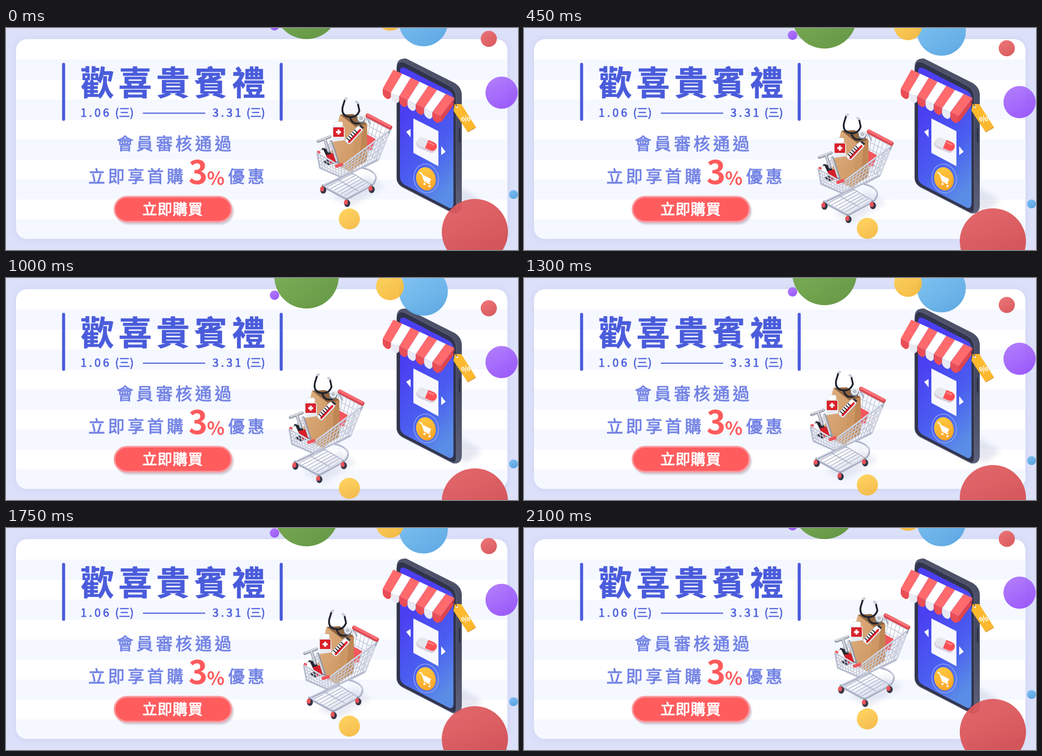
These frames come from a looping animation (920 by 400 pixels, 2.25 s). An HTML page:

```html
<!DOCTYPE html>
<html lang="zh-Hant">
<head>
<meta charset="utf-8">
<style>
html, body { margin: 0; width: 100%; height: 100%; overflow: hidden; }
svg { display: block; width: 920px; height: 400px; }
text { font-family: "Noto Sans CJK TC", "Noto Sans CJK", "Noto Sans", sans-serif; stroke-linejoin: round; }
.title { font-size: 60px; font-weight: 700; letter-spacing: 8px; fill: #4a5cdb; stroke: #4a5cdb; stroke-width: .6; }
.date { font-size: 20px; fill: #4a5cdb; stroke: #4a5cdb; stroke-width: .7; }
.day { letter-spacing: 4.2px; }
.note { font-size: 30px; letter-spacing: 5.2px; fill: #7282e4; stroke: #7282e4; stroke-width: .9; }
.red { font-weight: 700; fill: #ff5a5c; }
.buy { font-size: 26.5px; letter-spacing: .8px; fill: #fff; stroke: #fff; stroke-width: 1; }
</style>
</head>
<body>
<svg viewBox="0 0 920 400">
<defs>
  <filter id="soft" x="-30%" y="-30%" width="160%" height="160%"><feGaussianBlur stdDeviation="5"/></filter>
  <filter id="near" x="-10%" y="-30%" width="120%" height="170%"><feGaussianBlur stdDeviation="1.5"/></filter>
  <linearGradient id="screen" x1=".2" y1="0" x2=".6" y2="1">
    <stop offset=".25" stop-color="#4b3ff2"/><stop offset=".65" stop-color="#4a5df0"/><stop offset="1" stop-color="#5a8de6"/>
  </linearGradient>
  <linearGradient id="side" x1="0" y1="0" x2="0" y2="1">
    <stop offset="0" stop-color="#50546b"/><stop offset=".5" stop-color="#43475f"/><stop offset="1" stop-color="#5c6078"/>
  </linearGradient>
  <linearGradient id="gold" x1="0" y1="0" x2="0" y2="1">
    <stop offset="0" stop-color="#ffc93f"/><stop offset="1" stop-color="#faa52b"/>
  </linearGradient>
  <linearGradient id="paper" x1="0" y1="0" x2="1" y2="1">
    <stop offset="0" stop-color="#e0b184"/><stop offset="1" stop-color="#cc955f"/>
  </linearGradient>
  <clipPath id="card"><rect x="18" y="20" width="883" height="360" rx="20"/></clipPath>
</defs>

<rect width="920" height="400" fill="#dce0f9"/>
<rect x="16" y="18" width="887" height="365" rx="22" fill="#cbd1f2" opacity=".65" filter="url(#soft)"/>
<g clip-path="url(#card)">
  <rect width="920" height="400" fill="#fff"/>
  <path d="M0 75H920M0 147H920M0 219H920M0 291H920M0 363H920" stroke="#f5f8ff" stroke-width="36"/>
</g>

<path d="M103.500 65.500V164.500M494.500 65.500V164.500" stroke="#4a5cdb" stroke-width="5.500" stroke-linecap="round"/>
<text class="title" x="134" y="121">歡喜貴賓禮</text>
<text class="date day" x="134" y="160">1.06</text>
<text class="date" x="196" y="160">(三)</text>
<text class="date day" x="371" y="160">3.31</text>
<text class="date" x="432" y="160">(三)</text>
<path d="M246 153.500H358" stroke="#4a5cdb" stroke-width="2"/>
<text class="note" x="199" y="219">會員審核通過</text>
<text class="note" x="148" y="278">立即享首購</text>
<text class="red" x="328" y="281" font-size="58">3</text>
<text class="red" x="361" y="283" font-size="33">%</text>
<text class="note" x="399" y="278">優惠</text>

<rect x="197" y="307" width="212" height="47" rx="23.500" fill="#b9a9b8" opacity=".6" filter="url(#near)"/>
<rect x="195" y="304" width="210" height="45" rx="22.500" fill="#ff5c5e" stroke="#f99a9f" stroke-width="3"/>
<text class="buy" x="245" y="336">立即購買</text>

<g id="phone">
  <path d="M780 322 819 288 856 312 830 332Z" fill="#b9bed6" opacity=".35" filter="url(#soft)"/>
  <path d="M702 70Q702 54 719 55L806 99Q819 107 819 121V321Q818 336 803 334L712 287Q702 281 702 270Z" fill="url(#side)"/>
  <path d="M702 72Q703 57 716 62L797 104Q809 111 809 125V324Q809 336 799 331L712 286Q702 280 702 270Z" fill="#31344d" stroke="#747890" stroke-width=".7"/>
  <path d="M708 78Q708 68 719 73L794 112Q804 117 804 128V317Q803 328 794 323L717 283Q708 278 708 268Z" fill="url(#screen)"/>
  <path d="M815 180V206" stroke="#282b40" stroke-width="2"/>
  <path d="M732 163 777 186V249L732 225Z" fill="#f7f8ff"/>
  <path d="M719 187 727 182V197ZM782 213 790 223 782 229Z" fill="#fff"/>
  <g transform="rotate(23 756 209)">
    <rect x="738" y="205" width="37" height="16" rx="8" fill="#d9cfdd"/>
    <rect x="738" y="201" width="37" height="16" rx="8" fill="#e4e6ec"/>
    <path d="M756 201H767A8 8 0 0 1 767 217H756Z" fill="#ff5055"/>
    <path d="M759 205H768" stroke="#ff8587" stroke-width="2.500" stroke-linecap="round"/>
  </g>
  <g transform="rotate(-12 755 271)">
    <ellipse cx="755" cy="271" rx="22" ry="26" fill="none" stroke="#a7b5ff"/>
    <ellipse cx="755" cy="272" rx="17" ry="21" fill="#ef9a23"/>
    <ellipse cx="754" cy="271" rx="17" ry="20.500" fill="url(#gold)"/>
  </g>
  <path d="M743 260 747 262 752 276 762 281" fill="none" stroke="#fff" stroke-width="2"/>
  <path d="M748 264 764 272 761 279 751 274Z" fill="#fff"/>
  <circle cx="752" cy="281" r="2" fill="#fff"/><circle cx="761" cy="285" r="2" fill="#fff"/>
</g>
<g id="awning"></g>
<g id="tag">
  <path d="M806 137 818 137 844 178 829 187 804 149Z" fill="#fdb92e"/>
  <path d="M829 187 844 178 844 180 830 188Z" fill="#dc9222"/>
  <circle cx="810" cy="142" r="2" fill="#fff"/>
  <path d="M802 133Q808 134 810 142" fill="none" stroke="#34374f" stroke-width="1.200"/>
  <text x="826" y="170" font-size="16" font-weight="700" text-anchor="middle" fill="#fff" transform="rotate(-28 826 164)">%</text>
</g>

<g id="cart" stroke-linecap="round" stroke-linejoin="round">
  <path d="M585 306 650 264 680 286 622 322Z" fill="#b6bcd6" opacity=".28" filter="url(#soft)"/>
  <g id="deck" stroke="#b4bacd" stroke-width="1.500"></g>
  <g fill="none" stroke="#a9afc4" stroke-width="3">
    <path d="M668 238 640 252Q668 258 664 274 662 282 652 287L612 309 569 286 622 260"/>
    <path d="M667 236 640 250Q667 257 663 271 661 279 651 284L612 306 569 283 622 258" stroke="#d9ddea" stroke-width="1.500"/>
  </g>
  <g id="wheels"></g>
  <g id="back" stroke="#bfc4d5" stroke-width="1.200"></g>
  <path d="M644 189 664 200 659 219 640 224Z" fill="#f2575d"/>
  <path d="M600 156 624 155 649 173 626 181Z" fill="#8f6540"/>
  <path d="M600 156 628 178 619 259 580 240Z" fill="url(#paper)"/>
  <path d="M628 178 649 173V238L619 259Z" fill="#c08755"/>
  <path d="M628 178 641 175 634 248 619 259Z" fill="#cd9763"/>
  <g fill="none" stroke="#20232e" stroke-width="3.200">
    <path d="M609 129 605 142Q602 157 615 160 630 163 635 149L632 135"/>
    <path d="M618 160Q622 176 637 171"/>
    <path d="M609 128 612 127M632 135 629 133" stroke="#c9cdd6" stroke-width="4"/>
  </g>
  <circle cx="638" cy="164" r="7.500" fill="#777d8b"/>
  <circle cx="638" cy="162.500" r="6.500" fill="#eceff3"/><circle cx="638" cy="162.500" r="3.500" fill="#bcc2cb"/>
  <g transform="rotate(-47 626 192)">
    <rect x="606" y="186" width="38" height="12" rx="4" fill="#fff" stroke="#b5bac6"/>
    <path d="M610 194H639" stroke="#e8242d" stroke-width="4"/>
    <path d="M612 187V193M617 187V193M622 187V193M627 187V193M632 187V193" stroke="#252832" stroke-width="1.800"/>
    <rect x="643" y="188" width="4" height="8" fill="#363a45"/>
  </g>
  <path d="M586 176 608 178 609 202 588 205Z" fill="#e8ebf1"/>
  <rect x="590" y="169" width="15" height="9" rx="3" fill="#fff" stroke="#d3d7e0" stroke-width=".7"/>
  <rect x="588" y="179" width="19" height="17" rx="1" fill="#d9222b"/>
  <path d="M597.500 183V192M593 187.500H602" stroke="#fff" stroke-width="3.500" stroke-linecap="butt"/>
  <path d="M568 216 580 219 594 242 579 248 566 238Z" fill="#252631"/>
  <path d="M575 229 590 225 594 240 583 246Z" fill="#d5202a"/>
  <path d="M562 223 570 219 578 236 568 241Z" fill="#fff"/>
  <path d="M561 204 582 196M573 201 580 222M584 205 596 242" stroke="#8f95a3" stroke-width="5.500"/>
  <path d="M561 203 582 195M573 201 579 221M583 205 594 239" stroke="#d2d5dc" stroke-width="3"/>
  <g id="front" stroke="#c6cbda" stroke-width="1.500"></g>
  <path d="M559 225 602 250 690 184M559 225 564 252 603 269 669 237 690 184" fill="none" stroke="#b6bbce" stroke-width="3"/>
  <path d="M559 224 602 249 690 183M690 184 669 236" fill="none" stroke="#e2e5ef" stroke-width="1.500"/>
  <path d="M648 159 654 173M692 180 688 190" stroke="#aab0c3" stroke-width="3"/>
  <path d="M650 158 690 179" stroke="#d94750" stroke-width="8"/>
  <path d="M650 156.500 690 177.500" stroke="#ff7076" stroke-width="4"/>
  <path d="M594 249 603 246" stroke="#f0555b" stroke-width="6"/>
  <path d="M561 223 563 224" stroke="#f0555b" stroke-width="4"/>
</g>
<g id="bubbles"></g>
</svg>

<script>
const $ = id => document.getElementById(id);
const add = (id, markup) => $(id).insertAdjacentHTML('beforeend', markup);
const mix = (p, q, k) => [p[0] + (q[0] - p[0]) * k, p[1] + (q[1] - p[1]) * k];

// Wire mesh over the quad a-b-c-d
function mesh(id, a, b, c, d, cols, rows) {
  let path = '';
  for (let i = 0; i <= cols; i++) path += `M${mix(a, b, i / cols)}L${mix(d, c, i / cols)}`;
  for (let j = 0; j <= rows; j++) path += `M${mix(a, d, j / rows)}L${mix(b, c, j / rows)}`;
  add(id, `<path d="${path}" fill="none"/>`);
}
mesh('back', [559, 225], [648, 162], [640, 222], [564, 252], 12, 5);
mesh('back', [648, 162], [690, 184], [669, 237], [640, 222], 6, 5);
mesh('front', [559, 225], [602, 250], [603, 269], [564, 252], 8, 4);
mesh('front', [602, 250], [690, 184], [669, 237], [603, 269], 13, 5);
mesh('deck', [569, 284], [612, 307], [655, 281], [618, 259], 7, 2);

for (const [x, y] of [[569, 291], [612, 315], [656, 290]]) {
  add('wheels', `<path d="M${x} ${y - 7}V${y}" stroke="#989eb2" stroke-width="4"/>
    <ellipse cx="${x + 1}" cy="${y + 1}" rx="5.5" ry="6.5" fill="#343747"/>
    <ellipse cx="${x - 1}" cy="${y - 1}" rx="3.5" ry="4.5" fill="#ee5158"/>`);
}

const stripes = 7, top0 = [696, 75], top1 = [806, 126], low0 = [677, 109], low1 = [781, 159];
add('awning', '<path d="M806 126 804 139 781 171V159Z" fill="#dd454e"/>');
for (let i = 0; i < stripes; i++) {
  const [a, b] = [i, i + 1].map(k => mix(top0, top1, k / stripes));
  const [d, c] = [i, i + 1].map(k => mix(low0, low1, k / stripes));
  const [roof, flap] = i % 2 ? ['#fff', '#e9eaf3'] : ['#ff6a6c', '#e94e56'];
  add('awning', `<path d="M${d}L${c}v7q-2 7 -8 4q-7 -4 -7 -11Z" fill="${flap}"/>
    <path d="M${a}L${b}L${c}L${d}Z" fill="${roof}"/>`);
}

// x, y, radius, light tone, dark tone
[
  [540, -38, 58, '#7fb353', '#5c9239'],
  [750, -11, 44, '#7fc4f3', '#55a5e2'],
  [690, -20, 25, '#ffd253', '#f5b83a'],
  [482.5, -4, 8.5, '#ae70ff', '#9150f5'],
  [867.5, 19.5, 14.5, '#ec6a6c', '#d65054'],
  [890.5, 116.5, 29, '#ab74fb', '#954ffa'],
  [912, 300, 8, '#73bbf0', '#4f9fdf'],
  [842.5, 367.5, 59.5, '#e05c60', '#d0474b'],
  [617, 344, 19, '#ffd155', '#f6b941']
].forEach(([x, y, r, light, dark], i) => add('bubbles',
  `<linearGradient id="b${i}" x1=".2" y1="0" x2=".7" y2="1"><stop stop-color="${light}"/><stop offset="1" stop-color="${dark}"/></linearGradient>
  <circle cx="${x}" cy="${y}" r="${r}" fill="url(#b${i})" opacity=".93"/>`));

// Two straight legs in whole pixels: fast for 11 steps, slower for the last 9
const glide = (n, mid, end) => Math.round(n < 11 ? mid * n / 11 : mid + (end - mid) * (n - 11) / 9);

function draw() {
  const tick = Math.floor(performance.now() % 2250 / 50);
  const n = Math.max(0, Math.min(tick, 20, 42 - tick));
  $('cart').setAttribute('transform', `translate(${-glide(n, 37, 50)} ${glide(n, 35, 47)})`);
  $('bubbles').setAttribute('transform', `translate(0 ${glide(n, 21, 35)})`);
  requestAnimationFrame(draw);
}
draw();
</script>
</body>
</html>
```
